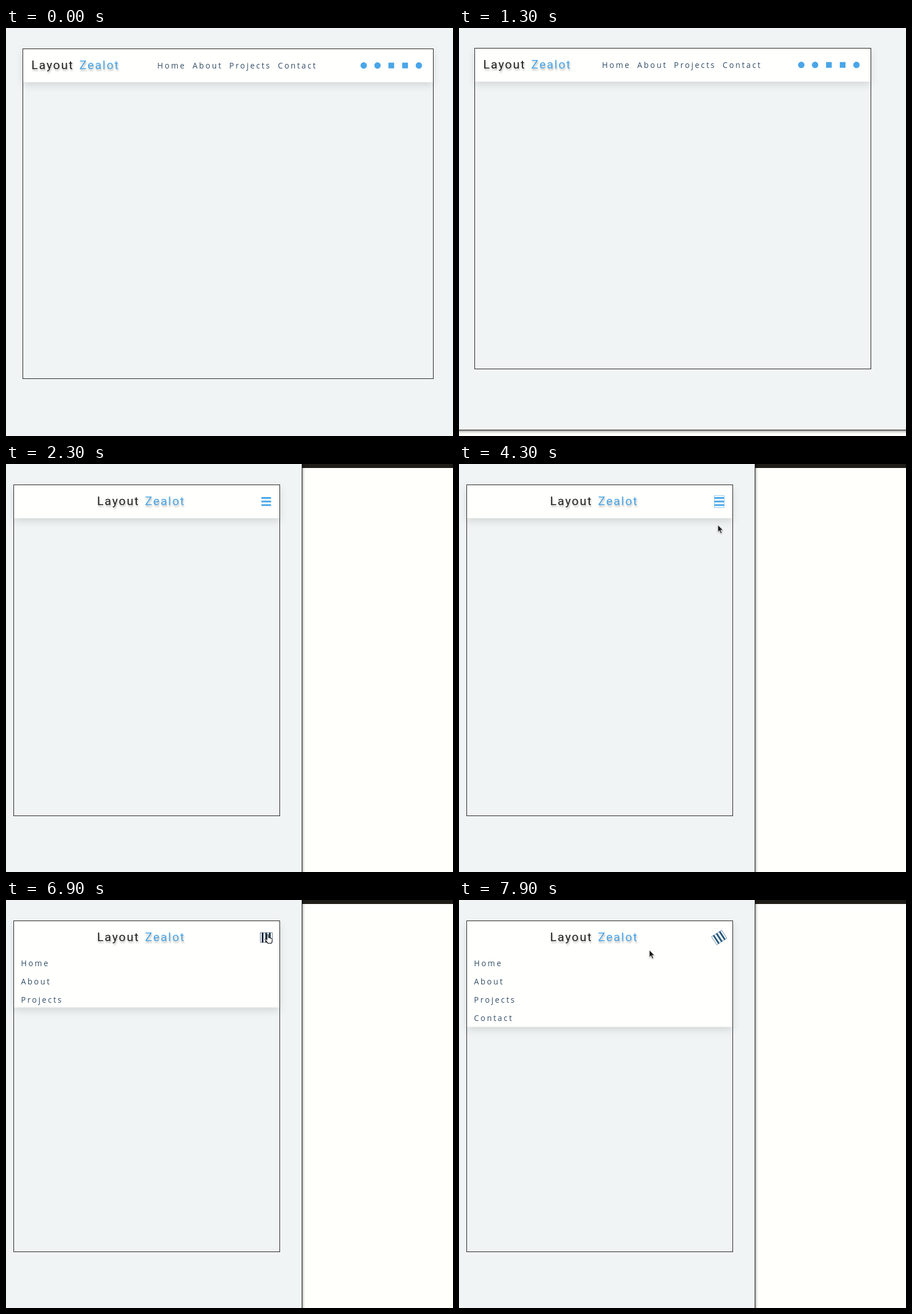
These frames come from a looping animation (783x715 px, 8 s). An HTML page:

```html
<!DOCTYPE html>
<html lang="en">
<head>
<meta charset="utf-8">
<title>Responsive navbar</title>
<style>
  html, body { margin: 0; width: 100%; height: 100%; overflow: hidden; background: #fffffc; }
  #stage { display: block; position: absolute; left: 0; top: 0; }
  #page { fill: #f0f4f4; stroke: #181816; filter: drop-shadow(1px 2px 2px rgba(0, 0, 0, .45)); }
  #nav { fill: #fffffd; filter: drop-shadow(0 5px 7px rgba(0, 0, 0, .12)); }
  #frame { fill: none; stroke: #222; }
  #logo { font: 21px Roboto, sans-serif; letter-spacing: 1.9px; fill: #222;
          filter: drop-shadow(1px 3px 1.5px rgba(0, 0, 0, .28)); }
  #logo .accent, #icons { fill: #49a6e9; }
  .links { font: 13.7px "Open Sans", "Noto Sans", sans-serif; letter-spacing: 2.85px; fill: #324d67; }
  #burger { fill: none; stroke: currentColor; }
  .arrow { stroke: #fff; stroke-width: .8; fill: #1c1c1c; filter: drop-shadow(0 1px 1px rgba(0, 0, 0, .3)); }
  #hand { fill: #fff; stroke: #222; stroke-width: 1.1; stroke-linejoin: round; }
</style>
</head>
<body>
<svg id="stage" width="783" height="715" viewBox="0 0 783 715">
  <rect width="783" height="715" fill="#fffffc"/>
  <rect width="783" height="7" fill="#1f1d18"/>
  <rect id="page" x="-20.5" y="-20.5"/>
  <rect id="nav"/>
  <rect id="frame"/>
  <g id="logo"><text>Layout</text><text class="accent" x="84">Zealot</text></g>
  <svg id="row" class="links"></svg>
  <svg id="menu" class="links"></svg>
  <g id="icons"></g>
  <g id="burger">
    <rect id="outline" x="-8.5" y="-10.5" width="17" height="21" stroke-width=".6"/>
    <path d="M-8.5-6.3h17M-8.5 0h17M-8.5 6.3h17" stroke-width="3"/>
  </g>
  <path id="resize" class="arrow" d="M-4.5-4.5h4.5l-1.5 1.5 4.5 4.5 1.5-1.5v5h-5l1.5-1.5-4.5-4.5-1 1z"/>
  <path id="arrow" class="arrow" d="M-.6.8v12.6l2.9-2.7 2.2 5 2.2-1-2.2-4.8h4z"/>
  <path id="hand" d="M4.2 8.8V1.8q0-1.3 1.2-1.3t1.2 1.3v4.2q2-.7 2.3.6 1.9-.5 2.2.8 2-.2 2.1 1.4v2.8q0 2-1.2 3.3v1H5.4v-1.2L1 9.9Q.2 8.7 1.2 8.1t3 1.9z"/>
</svg>
<script>
const LOOP = 8000, TICK = 100;
const $ = id => document.getElementById(id);
const clamp = v => Math.min(1, Math.max(0, v));
const lerp = (a, b, k) => a + (b - a) * k;
const easeOut = p => 1 - (1 - clamp(p)) ** 3;

const set = (id, attrs) => {
  for (const key in attrs) $(id).setAttribute(key, attrs[key]);
};
const show = (on, ...ids) => ids.forEach(id => $(id).style.display = on ? '' : 'none');
const move = (id, x, y, extra = '') => set(id, { transform: `translate(${x} ${y}) ${extra}` });
const add = (parent, tag, attrs, text = '') => {
  const el = document.createElementNS('http://www.w3.org/2000/svg', tag);
  for (const key in attrs) el.setAttribute(key, attrs[key]);
  el.textContent = text;
  $(parent).append(el);
  return el;
};

// Runs moves { from, to, at } one after another and rests in between
const follow = (start, moves, t) => moves.reduce((pos, { from, to, at }) =>
  pos.map((v, i) => lerp(v, at[i], clamp((t - from) / (to - from)))), start);

const drags = [
  { from: 800, to: 1300, at: [771.5, 624.5] },
  { from: 1400, to: 1900, at: [635.5, 622] },
  { from: 2000, to: 2300, at: [518, 644.4] }
];
const pointerMoves = [
  { from: 3200, to: 3500, at: [560, 582] },
  { from: 3600, to: 3800, at: [461, 332] },
  { from: 3900, to: 4100, at: [477, 157] },
  { from: 4200, to: 4300, at: [454, 106] },
  { from: 4300, to: 4500, at: [453, 60] },
  { from: 7800, to: 7900, at: [334, 87] }
];
const turns = [
  { from: 4450, to: 4800, at: [90] },
  { from: 7800, to: 7900, at: [57] }
];

const menuOpen = t => {
  const toggle = start => easeOut((t - start) / 400);
  return toggle(5468) - toggle(6860) + toggle(7568);
};

const gap = 23.8;
let rowX = 0;
['Home', 'About', 'Projects', 'Contact'].forEach((label, i) => {
  const link = add('row', 'text', { x: rowX, y: 71 }, label);
  rowX += link.getComputedTextLength() + 11.5;
  add('menu', 'text', { x: 12.3, y: 116 + 32 * i }, label);
});
const icons = ['circle', 'circle', 'rect', 'rect', 'circle'].map(tag => add('icons', tag,
  tag === 'circle' ? { r: 5.6 } : { x: -5, y: -5, width: 10, height: 10 }));

function draw(t) {
  const [w, h] = follow([799, 642], drags, t);
  const mobile = w < 600;
  const left = Math.floor(w * .05 - 10.8) - 2 * mobile;
  const top = Math.round(h * .05 + 4.1);
  const width = Math.round(w * .9), height = Math.round(h * .9);
  const right = left + width, center = left + width / 2;
  const edge = Math.floor(w + (mobile ? 0 : 16)) + .5;
  const bottom = Math.floor(h + 79.8) + .5;
  const shrink = Math.min(1, width / 600);

  set('page', { width: edge + 20.5, height: bottom + 20.5 });
  set('frame', { x: left + .5, y: top + .5, width, height });
  const navEnd = top + 59 + 128 * menuOpen(t);
  set('nav', { x: left + 1, y: top + 1, width: width - 1, height: navEnd - top - 1 });
  move('logo', mobile ? center - 86.5 : left + 15.5, top + 36, `scale(${shrink === 1 || mobile ? 1 : shrink})`);
  show(!mobile, 'row', 'icons');
  show(mobile, 'menu', 'burger');

  const linksX = Math.max(center - 123.4, left + 176 - 153 * (1 - shrink));
  set('row', { x: linksX, y: top - 36, width: Math.max(0, right - 128 - linksX), height: 120 });
  icons.forEach((icon, i) =>
    icon.setAttribute('transform', `translate(${right - 24.8 - (4 - i) * 24.15 * shrink} ${top + 29.7})`));

  set('menu', { x: left + 1, width: width - 1, height: navEnd });
  const [turn] = follow([0], turns, t);
  const tint = [[73, 16], [166, 42], [233, 66]].map(([a, b]) => lerp(a, b, turn / 90));
  move('burger', right - 23.2, top + 29.7, `rotate(${turn})`);
  $('burger').style.color = `rgb(${tint})`;
  show(t >= 3300, 'outline');

  const kind = t < 3300 ? 'resize' : t >= 4500 && t < 7900 ? 'hand' : 'arrow';
  const spot = kind === 'resize' ? [edge, bottom - .5] : follow([550, 595], pointerMoves, t);
  show(false, 'resize', 'arrow', 'hand');
  show(true, kind);
  move(kind, ...spot);
}

let shown = -1;
function loop() {
  const t = Math.floor(performance.now() % LOOP / TICK) * TICK;
  if (t !== shown) draw(shown = t);
  requestAnimationFrame(loop);
}
loop();
</script>
</body>
</html>
```
